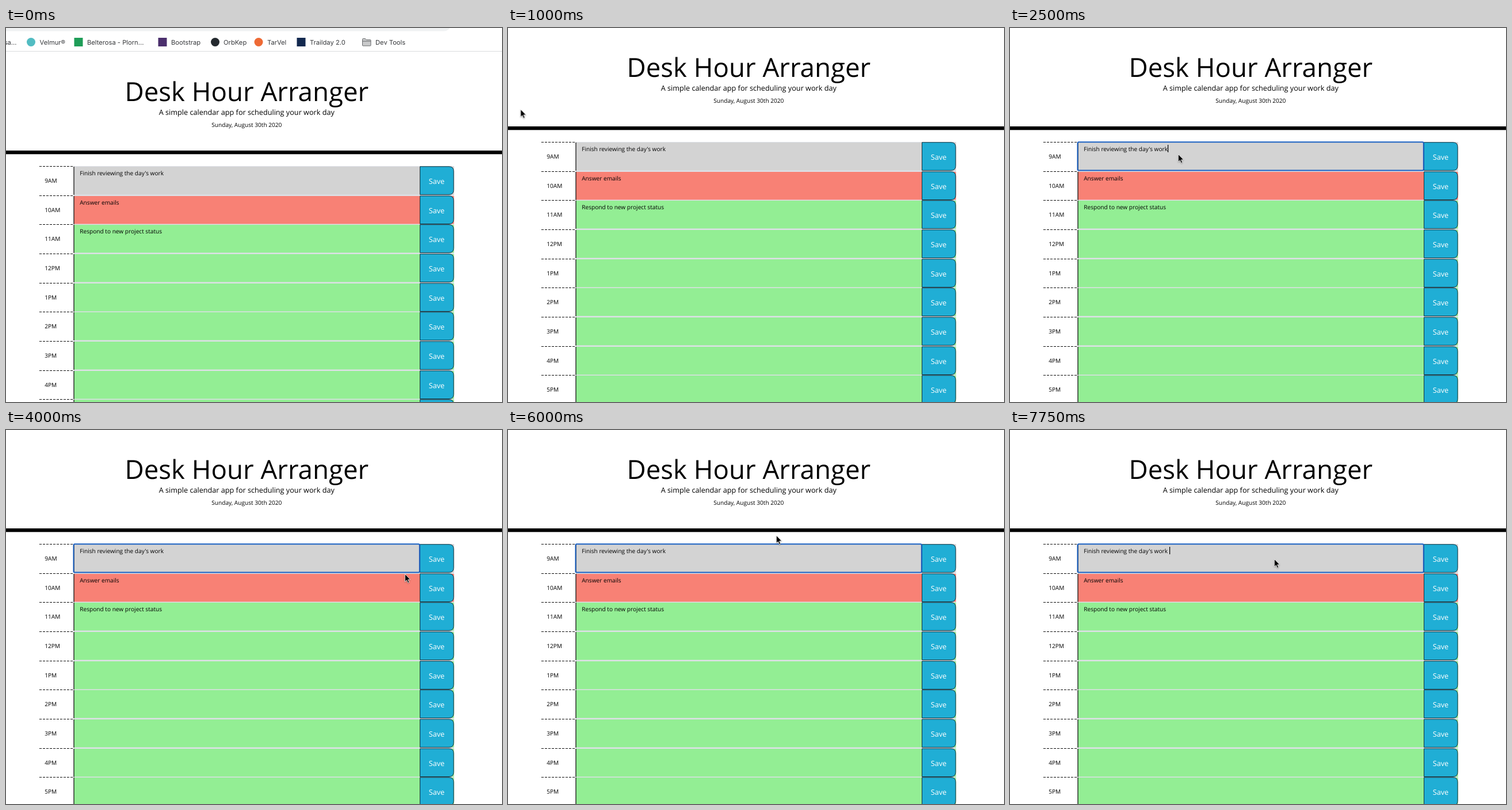
Write an HTML page that moves like this. It is 862 by 650 pixels and loops after 8 s.

```html
<!DOCTYPE html>
<html lang="en">
<head>
<meta charset="utf-8">
<title>Day planner</title>
<style>
html, body { margin: 0; width: 862px; height: 650px; overflow: hidden; background: #fff; }
svg { display: block; }
text { font: 10.13px "Open Sans", sans-serif; text-rendering: geometricPrecision; }
.mid { text-anchor: middle; }
.title { font-size: 45.6px; }
.lead, .save { font-size: 12.67px; }
.save { fill: #fff; }
#bar text { font: 11.2px Inter, sans-serif; fill: #37393c; }

#page, #bar, #focus, #caret, #cursor { animation: 8s step-end infinite; }
#page { animation-name: scroll; }
#bar { animation-name: bar; }
#focus { animation-name: focus; }
#caret { animation-name: caret; }
#cursor { animation-name: cursor; filter: drop-shadow(0 1px 1px #0005); }

@keyframes scroll { 0% { transform: translateY(42px); } 12.5%, 100% { transform: none; } }
@keyframes bar { 0% { opacity: 1; } 12.5%, 100% { opacity: 0; } }
@keyframes focus { 0% { opacity: 0; } 31.25%, 100% { opacity: 1; } }
@keyframes caret {
  0%, 37.5%, 50%, 62.5%, 75%, 87.5% { opacity: 0; transform: none; }
  31.25%, 43.75%, 56.25%, 68.75%, 81.25%, 93.75% { opacity: 1; transform: none; }
  96.875%, 100% { opacity: 1; transform: translateX(3px); }
}
@keyframes cursor {
  0% { opacity: 0; transform: translate(142px, 97px); }
  9.375% { opacity: 1; transform: translate(142px, 97px); }
  12.5% { transform: translate(21.5px, 141px); }
  15.625% { transform: translate(254px, 299px); }
  18.75% { transform: translate(262px, 208px); }
  25% { transform: translate(281px, 225px); }
  28.125% { transform: translate(292px, 234px); }
  31.25% { transform: translate(292px, 219px); }
  43.75% { transform: translate(484px, 261px); }
  46.875% { transform: translate(496px, 256px); }
  50% { transform: translate(693px, 250px); }
  53.125% { transform: translate(752px, 222px); }
  56.25% { transform: translate(754px, 225px); }
  62.5% { transform: translate(600px, 235px); }
  75% { transform: translate(466px, 183px); }
  78.125% { transform: translate(306px, 119px); }
  81.25%, 100% { opacity: 1; transform: translate(459px, 224px); }
}
</style>
</head>
<body>
<svg width="862" height="650" viewBox="0 0 862 650">
  <g id="page">
    <text class="mid title" x="418.3" y="84.8">Desk Hour Arranger</text>
    <text class="mid lead" x="418.3" y="108.9">A simple calendar app for scheduling your work day</text>
    <text class="mid" x="418.3" y="129.8">Sunday, August 30th 2020</text>
    <rect y="171" width="862" height="6.3"/>
    <g id="rows"></g>
    <rect id="focus" x="117.5" y="198.3" width="601.3" height="49.2" rx="2" fill="none" stroke="#1a60c2" stroke-width="2"/>
    <rect id="caret" x="274" y="203" width="1.2" height="13"/>
  </g>
  <g id="bar">
    <rect width="862" height="41" fill="#fff"/>
    <rect x="-20" y="-20" width="793" height="25.5" rx="12" fill="#f0f2f3"/>
    <rect y="40" width="862" height="1" fill="#d9dbdd"/>
    <text x="18.5" y="28.5" text-anchor="end">sa...</text>
    <g id="links"></g>
    <path d="M619.5 30V19.5q0-1 1-1h4l1.8 2H633q1 0 1 1V30q0 1-1 1H620.500q-1 0-1-1ZM619.500 23H634" fill="#c9cacb" stroke="#66686b"/>
  </g>
  <path id="cursor" d="M.4 .4V13.700L3.400 10.900L5.500 15.700L7.700 14.700L5.600 10H9.700Z" stroke="#fff" stroke-width=".8"/>
</svg>
<script>
const hours = ["9AM", "10AM", "11AM", "12PM", "1PM", "2PM", "3PM", "4PM", "5PM"];
const tasks = ["Finish reviewing the day's work", "Answer emails", "Respond to new project status"];
const fills = ["#d3d3d3", "#f88175"];

function row(hour, i) {
  const y = Math.round(198 + 50.66 * i);
  return `<g transform="translate(0 ${y})">
    <rect x="118" width="660.5" height="51" fill="#dde0e6"/>
    <rect x="118" y="1" width="660.5" height="48.500" fill="${fills[i] || "#93ee94"}"/>
    <path d="M58 .5H118" stroke="#000" stroke-dasharray="4 2"/>
    <path d="M118 1V50" stroke="#000" stroke-width="1.2"/>
    <path d="M719.500 .8H770q8 0 8 8V41.500q0 8-8 8H719.500Z" fill="#20aed5" stroke="#12303b"/>
    <text x="67.200" y="28.700">${hour}</text>
    <text x="128.200" y="15.600">${tasks[i] || ""}</text>
    <text class="mid save" x="748.500" y="30.700">Save</text>
  </g>`;
}

// label, text x, icon centre x, colour, round
const links = [
  ["Velmur®", 58.5, 43.5, "#52bcc2", true],
  ["Belterosa - Plorn...", 141, 126, "#1f9d58", false],
  ["Bootstrap", 287, 272, "#4b2f6d", false],
  ["OrbKep", 378, 363.5, "#24292e", true],
  ["TarVel", 454, 439, "#ee6a35", true],
  ["Trailday 2.0", 528, 513, "#12294f", false],
  ["Dev Tools", 642]
];

function link([label, x, cx, color, round]) {
  const icon = cx ? `<rect x="${cx - 7.5}" y="17" width="15" height="15" rx="${round ? 7.5 : 0}" fill="${color}"/>` : "";
  return `${icon}<text x="${x}" y="28.500">${label}</text>`;
}

document.getElementById("rows").innerHTML = hours.map(row).join("");
document.getElementById("links").innerHTML = links.map(link).join("");
</script>
</body>
</html>
```
